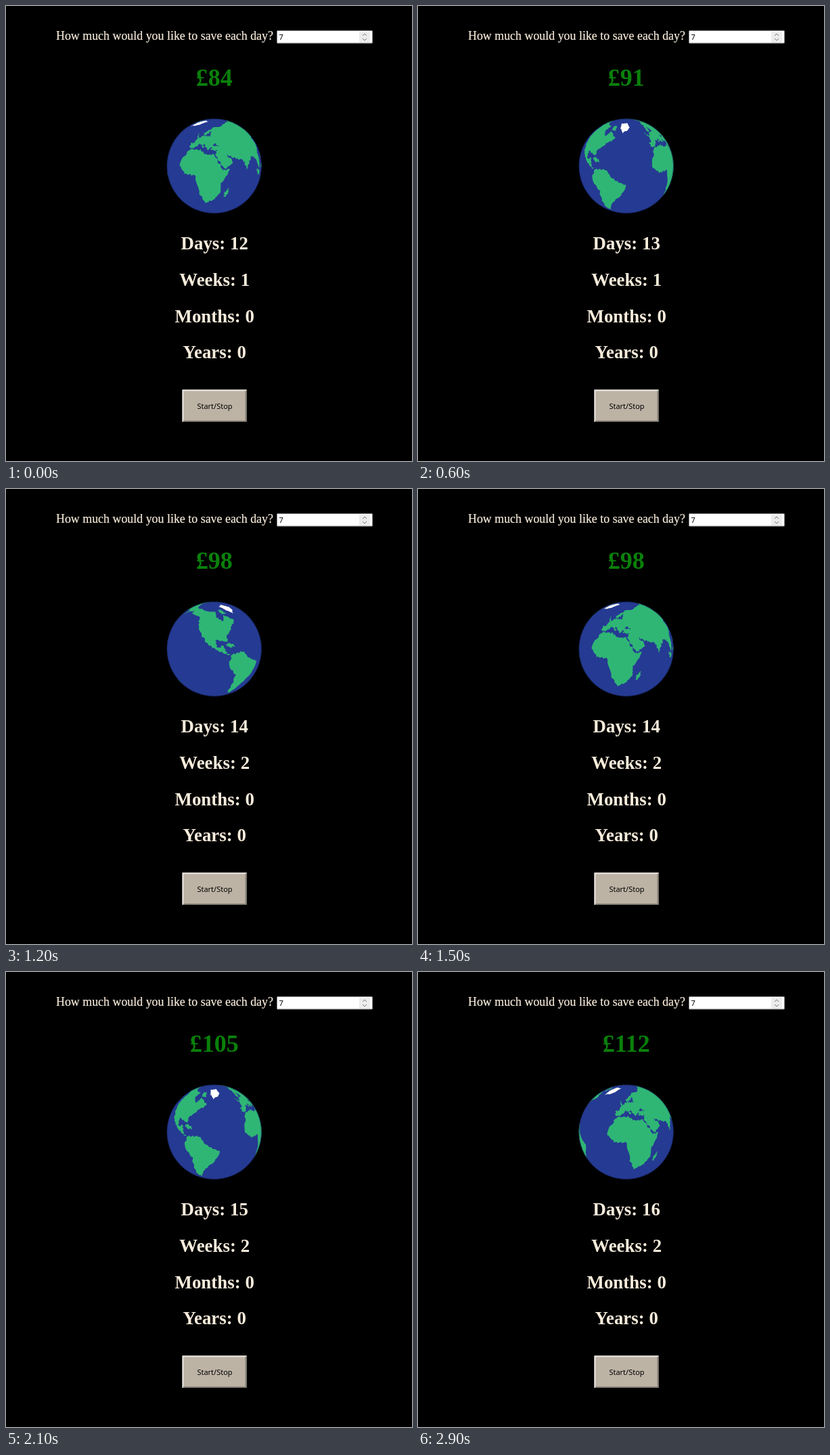
These frames come from a looping animation (600x673 px, 3 s). An HTML page:

```html
<!DOCTYPE html>
<html lang="en">
<head>
<meta charset="utf-8">
<title>Savings counter</title>
<style>
  html, body { margin: 0; width: 100%; height: 100%; overflow: hidden; background: #000; }
  svg { display: block; width: 600px; height: 673px; }
  text { font-family: "Liberation Serif", "Times New Roman", serif; fill: #f8ecdc; }
  .ask { font-size: 17.9px; stroke: #f8ecdc; stroke-width: .2px; }
  .total { font-size: 36px; font-weight: bold; fill: #0a800a; }
  .count { font-size: 26.9px; font-weight: bold; }
  .total, .count, .label { text-anchor: middle; }
  .ui { font: 11px "Noto Sans", "Open Sans", sans-serif; fill: #000; }
</style>
</head>
<body>
<svg viewBox="0 0 600 673">
  <text class="ask" x="74" y="50">How much would you like to save each day?</text>
  <rect x="400.5" y="36.5" width="141" height="18.5" rx="1" fill="#fff" stroke="#858585"/>
  <text class="ui" x="403.5" y="50">7</text>
  <rect x="522" y="38" width="16" height="16" fill="#ececec"/>
  <path d="M527 44l3-3 3 3M527 48l3 3 3-3" fill="none" stroke="#777"/>

  <text class="total" id="total" x="307.7" y="118"></text>

  <g transform="translate(307.7 236.7)">
    <circle r="70" fill="#253a92"/>
    <path id="land" fill="#2fb675"/>
    <path id="ice" fill="#fff"/>
    <circle r="69.7" fill="none" stroke="#101a48" stroke-opacity=".6"/>
  </g>

  <text class="count" id="days" x="308.2" y="360"></text>
  <text class="count" id="weeks" x="308.2" y="414"></text>
  <text class="count" x="308.2" y="468">Months: 0</text>
  <text class="count" x="308.2" y="521">Years: 0</text>

  <rect x="260.5" y="567.5" width="95" height="47.5" fill="#bdb3a5"/>
  <path d="M261.5 615V568.5H355.5" fill="none" stroke="#e9e6e1" stroke-width="2"/>
  <path d="M354.5 569V614H262" fill="none" stroke="#8b847a" stroke-width="2"/>
  <text class="ui label" x="308.5" y="596">Start/Stop</text>
</svg>
<script>
const RADIUS = 70, RAD = Math.PI / 180, TILT = 17 * RAD, SPLIT = 6;
const $ = id => document.getElementById(id);

// Key coast points as longitude, latitude pairs
const eurasia = [-9,37, -9,43, -2,44, -4,48, 8,56, 23,56, 24,65, 12,56, 5,60, 26,71, 105,77, 180,69,
  190,66, 163,60, 157,51, 156,60, 136,55, 140,48, 128,38, 120,39, 122,30, 108,21, 108,11, 103,2,
  98,16, 90,22, 80,14, 77,8, 72,21, 57,26, 50,30, 58,20, 45,13, 34,30, 36,36, 27,37, 28,42, 40,42,
  33,46, 23,37, 13,45, 16,38, 8,44, -1,37];
const africa = [-6,35, 11,36, 20,31, 32,31, 43,12, 51,12, 40,-5, 40,-16, 33,-27, 19,-35, 12,-17,
  9,4, -7,4, -17,14, -10,29];
const australia = [114,-23, 131,-12, 138,-17, 142,-11, 153,-27, 147,-39, 131,-32, 116,-35];
const northAmerica = [-168,66, -156,71, -95,69, -94,60, -80,52, -76,62, -56,52, -70,43, -81,31,
  -80,25, -97,28, -95,18, -87,21, -83,10, -77,8, -95,15, -108,23, -124,41, -133,57, -162,58];
const southAmerica = [-77,9, -62,11, -50,0, -35,-7, -41,-22, -58,-37, -68,-54, -74,-50, -71,-18, -81,-5];
const greenland = [-44,61, -54,70, -65,80, -25,82, -22,70];

// A lens-shaped island from one end to the other
function island(x1, y1, x2, y2) {
  const x = (x1 + x2) / 2, y = (y1 + y2) / 2;
  const dx = (x2 - x1) / 5, dy = (y2 - y1) / 5;
  return [x1, y1, x + dy, y - dx, x2, y2, x - dy, y + dx];
}
const britain = island(0, 51, -5, 58);
const madagascar = island(50, -12, 45, -25);
const japan = island(131, 32, 143, 43);
const sumatra = island(95, 5, 106, -6);
const borneo = island(109, 0, 118, 5);
const newGuinea = island(131, -1, 149, -9);
const philippines = island(120, 18, 125, 7);
const newZealand = island(168, -46, 177, -36);
const baffin = island(-86, 72, -64, 64);
const cuba = island(-84, 22, -72, 19);

// The artwork has a wide Atlantic
const west = shape => shape.map((v, i) => i % 2 ? v : v - 16);
const land = [eurasia, africa, australia, britain, madagascar, japan, sumatra, borneo, newGuinea,
  philippines, newZealand, ...[northAmerica, southAmerica, baffin, cuba].map(west)];
const ice = west(greenland);

function project(lon, lat, centre) {
  const a = (lon - centre) * RAD, b = lat * RAD;
  const across = Math.cos(b) * Math.cos(a);
  let x = Math.cos(b) * Math.sin(a);
  let y = Math.sin(TILT) * across - Math.cos(TILT) * Math.sin(b);
  const visible = Math.sin(TILT) * Math.sin(b) + Math.cos(TILT) * across > 0;
  if (!visible) {               // slide hidden points out to the limb
    const d = Math.hypot(x, y) || 1;
    x /= d;
    y /= d;
  }
  return { visible, text: (x * RADIUS).toFixed(1) + ' ' + (y * RADIUS).toFixed(1) };
}

function outline(shape, centre) {
  const points = [], n = shape.length;
  for (let i = 0; i < n; i += 2) {
    const j = (i + 2) % n;
    for (let k = 0; k < SPLIT; k++) {
      const mix = m => shape[i + m] + (shape[j + m] - shape[i + m]) * k / SPLIT;
      const lon = mix(0), lat = mix(1);
      // a small ripple roughens the straight stretches
      points.push(project(lon + Math.sin(lat * 1.7 + lon), lat + Math.sin(lon * 1.3), centre));
    }
  }
  return points.some(p => p.visible) ? 'M' + points.map(p => p.text).join('L') + 'Z' : '';
}

// Uneven spin: longitude facing the viewer at key ticks of 100 ms
const spin = [[0, 32], [4, 210], [9, 458], [15, 752], [21, 1022], [26, 1258], [29, 1448]];

function facing(step) {
  const i = Math.max(1, spin.findIndex(([tick]) => tick >= step));
  const [t0, a] = spin[i - 1], [t1, b] = spin[i];
  return a + (b - a) * (step - t0) / (t1 - t0);
}

let shown = -1;

function draw() {
  const step = Math.floor(performance.now() % 3000 / 100);
  if (step !== shown) {
    shown = step;
    const centre = facing(step);
    $('land').setAttribute('d', land.map(s => outline(s, centre)).join(''));
    $('ice').setAttribute('d', outline(ice, centre));

    const days = 12 + Math.floor((step + 7) / 9);
    $('total').textContent = '£' + days * 7;
    $('days').textContent = 'Days: ' + days;
    $('weeks').textContent = 'Weeks: ' + Math.floor(days / 7);
  }
  requestAnimationFrame(draw);
}
draw();
</script>
</body>
</html>
```
